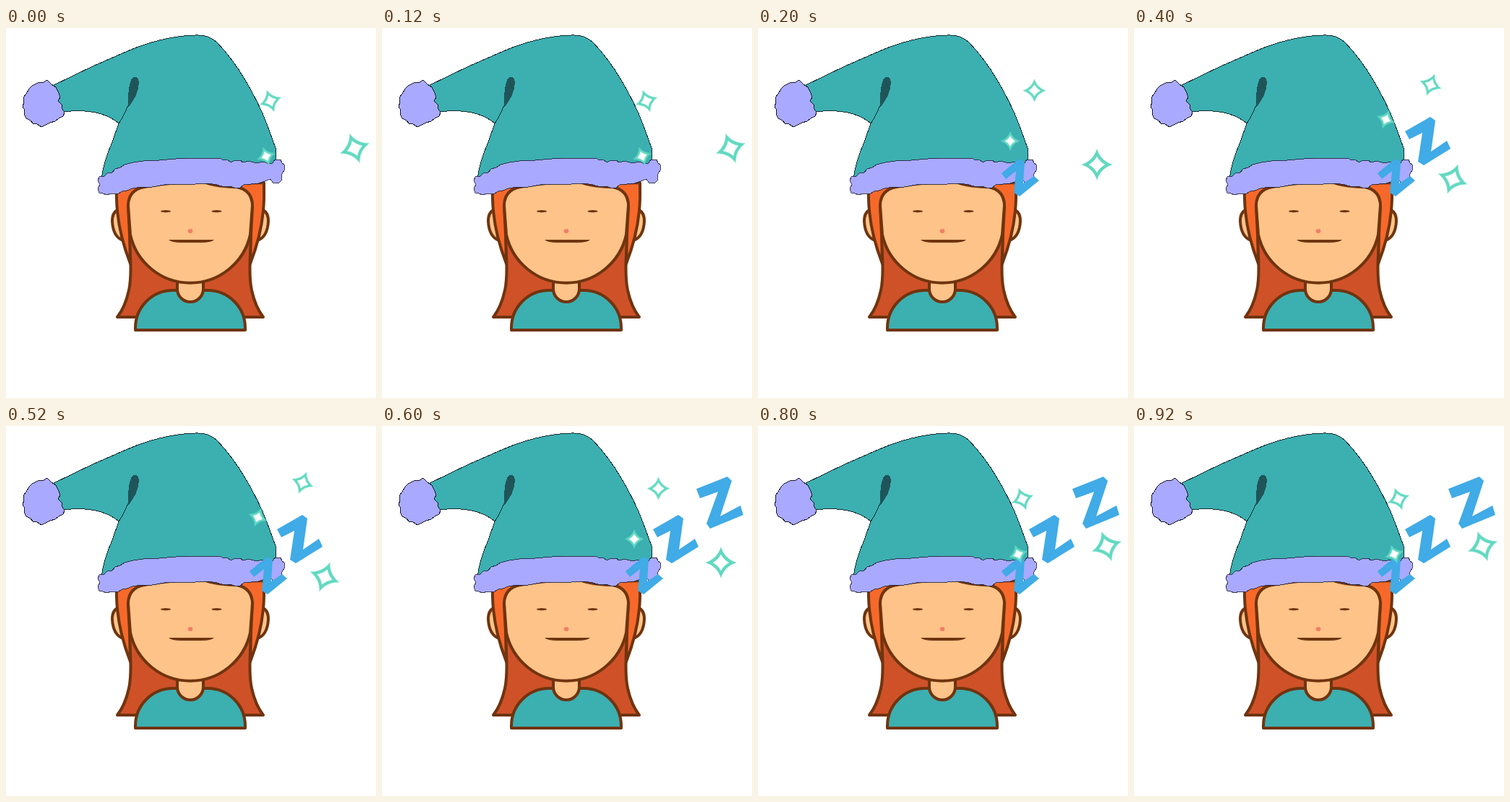
An HTML page that plays this animation: 512x512 px, repeating every 1 s.

```html
<!DOCTYPE html>
<html lang="en">
<head>
<meta charset="utf-8">
<title>Sleepy girl</title>
<style>
  html, body { margin: 0; width: 100%; height: 100%; overflow: hidden; background: #fff; }
  svg { display: block; width: 100vw; height: 100vh; }
  .line { stroke: #70340f; stroke-width: 4; stroke-linejoin: round; stroke-linecap: round; }
  .skin { fill: #fdc388; }
  .back { fill: #cf5128; }
  .front { fill: #f6692a; }
  .teal { fill: #3cafb1; }
  .fur { fill: #a9a9ff; stroke: #17172c; stroke-width: 1; stroke-linejoin: bevel; }
  .edge { stroke: #102c2e; stroke-width: 1; }
  .rough { shape-rendering: crispEdges; }
  .z { fill: #40abe6; opacity: 0; }
  .star { fill: #60d9c0; }
  .star .core { fill: #fff; }
</style>
</head>
<body>
<svg viewBox="0 0 512 512">
  <!-- hair behind -->
  <path class="back line" d="M170 285C173 318 174 345 170 363Q165 386 154 400H356Q345 386 340 363C336 345 337 318 340 285Z"/>
  <!-- ears -->
  <path class="skin line" d="M160 250Q147 252 147 267Q148 289 162 294Z"/>
  <path class="skin line" d="M350 250Q363 252 363 267Q362 289 348 294Z"/>
  <!-- front strands -->
  <path class="front line" d="M153 214V236Q154 280 172 326L171 285L169 245L200 215Z"/>
  <path class="front line" d="M357 214V236Q356 280 338 326L339 285L341 245L310 215Z"/>
  <!-- shirt and neck -->
  <path class="teal line" d="M179 418V415A52 52 0 0 1 231 363H279A52 52 0 0 1 331 415V418Z"/>
  <path class="skin line" d="M237 340V361A18 18 0 0 0 273 361V340Z"/>
  <!-- face -->
  <path class="skin line" d="M169 245Q170 224 191 220L220 213H290L319 220Q340 224 341 245L338 286A85 85 0 0 1 172 286Z"/>
  <path d="M190 222Q215 218 236 216V212H268Q282 221 318 222V210H190Z" fill="#70340f"/>
  <g fill="#70340f">
    <ellipse cx="221" cy="253.7" rx="7" ry="1.6"/>
    <ellipse cx="291.5" cy="253.7" rx="7" ry="1.6"/>
    <path d="M225 293H288Q284 297 270 297H243Q229 297 225 293Z"/>
  </g>
  <ellipse cx="255" cy="281" rx="3.4" ry="3" fill="#ee8068"/>
  <!-- cap -->
  <g class="rough">
    <path class="teal edge" d="M64 80L120 53L168 32Q218 11 262 10Q281 9 292 20Q314 43 331 72Q350 104 361 133L373 166L374 190L132 208Q136 182 147 158L156 132Q130 110 79 116Z"/>
    <path class="edge" d="M156 132Q163 122 168 109" fill="none"/>
    <path d="M174 70Q179 65 183 70Q185 78 181 90Q178 99 168 111Q170 102 169 94Q170 78 174 70Z" fill="#1f5558"/>
    <path class="fur" d="M57 72L63 78L69 82L73 90L75 96L72 101L77 106L78 112L81 117L79 122L73 125L68 129L61 131L55 134L49 137L43 133L37 132L34 128L28 125L25 119L26 114L23 109L25 102L24 96L28 91L32 84L36 80L40 78L46 75L52 75Z"/>
    <path class="fur" stroke-opacity=".8" d="M129 206L136 205L141 200L146 201L151 195L158 193L164 189L176 186L190 184L212 183L235 181L265 180L297 180L300 183L306 182L311 186L317 183L324 183L328 186L336 184L346 187L356 185L364 188L369 187L372 182L380 182L382 187L385 189L385 197L382 202L381 211L377 215L369 214L366 209L358 212L349 215L339 216L329 217L324 221L318 222L311 219L302 220L292 217L279 215L262 216L240 216L219 217L202 220L187 220L175 222L167 225L161 226L154 230L146 229L139 231L134 229L129 228L127 222L130 217L127 211Z"/>
  </g>
  <!-- snores -->
  <path class="z" d="M337 201L361 181L369 185L367 215L382 205L389 211L362 233L354 228L357 198L343 209Z"/>
  <path class="z" d="M375 143L410 123L417 128L411 171L433 156L438 167L401 190L393 185L399 145L381 154Z"/>
  <path class="z" d="M435 87L478 70L484 76L468 125L496 110L500 123L454 142L449 135L465 91L440 100Z"/>
  <g id="stars"></g>
</svg>
<script>
  const LOOP = 1000, STEP = 0.2;

  // x, y for the three poses of each star
  const stars = [
    { r: 21, at: [[482.5, 166.5], [469, 189], [441, 209]] },
    { r: 15.5, at: [[366, 101], [382.5, 86.5], [410.5, 78.5]] },
    { r: 13, at: [[360, 177.5], [349, 156.5], [348.5, 126.5]] }
  ];
  const turns = [-19, 0, 20];
  const poses = [0, 1, 2, 1, 0];

  const spark = (r, c) =>
    `M0 ${-r}Q${c} ${-c} ${r} 0Q${c} ${c} 0 ${r}Q${-c} ${c} ${-r} 0Q${-c} ${-c} 0 ${-r}Z`;

  function play(el, prop, values) {
    const frames = values.map((v, i) => ({ [prop]: v, offset: i * STEP, easing: 'step-end' }));
    frames.push({ [prop]: values[values.length - 1], offset: 1 });
    const anim = el.animate(frames, { duration: LOOP, iterations: Infinity });
    anim.startTime = 0;
  }

  const sky = document.getElementById('stars');
  for (const { r, at } of stars) {
    const g = document.createElementNS('http://www.w3.org/2000/svg', 'g');
    g.setAttribute('class', 'star');
    g.innerHTML = `<path d="${spark(1.03, 0.24)}"/><path class="core" d="${spark(0.54, 0.19)}"/>`;
    sky.append(g);
    play(g, 'transform', poses.map(p =>
      `translate(${at[p][0]}px, ${at[p][1]}px) rotate(${turns[p]}deg) scale(${r})`));
  }

  document.querySelectorAll('.z').forEach((z, n) =>
    play(z, 'opacity', poses.map((_, i) => (i > n ? 1 : 0))));
</script>
</body>
</html>
```
